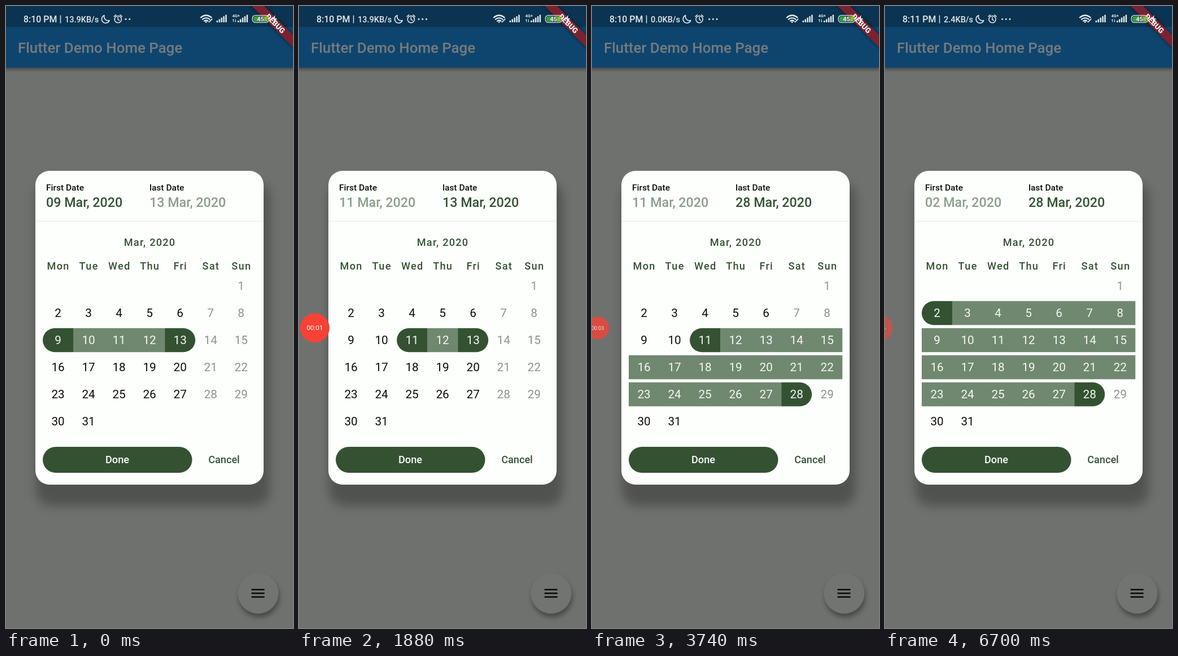
Write an HTML page that moves like this. It is 508x1102 px and loops after 7040 ms.

```html
<!DOCTYPE html>
<html lang="en">
<head>
<meta charset="utf-8">
<title>Date range picker</title>
<style>
html, body { margin: 0; width: 100%; height: 100%; overflow: hidden; background: #6f716f; }
svg { display: block; width: 100%; height: 100%; font-family: Roboto, sans-serif; }
.med { font-weight: 500; }
.mid { text-anchor: middle; }
.green { fill: #345232; }
.label { font-size: 15.5px; font-weight: 500; fill: #0b0d0b; }
.date { font-size: 23.28px; font-weight: 500; fill: #345232; }
.head { font-size: 18.1px; font-weight: 500; letter-spacing: 1.29px; fill: #345232; text-anchor: middle; }
.day { font-size: 20.7px; text-anchor: middle; }
.btn { font-size: 18.1px; font-weight: 500; text-anchor: middle; }
.line { fill: none; stroke: #e6eaec; stroke-width: 1.6; stroke-linecap: round; stroke-linejoin: round; }
</style>
</head>
<body>
<svg viewBox="0 0 508 1102" xmlns="http://www.w3.org/2000/svg">
  <defs>
    <filter id="blur9" x="-20%" y="-20%" width="140%" height="140%"><feGaussianBlur stdDeviation="9"/></filter>
    <filter id="blur4" x="-30%" y="-30%" width="160%" height="160%"><feGaussianBlur stdDeviation="4"/></filter>
    <filter id="blur3" x="-30%" y="-60%" width="160%" height="220%"><feGaussianBlur stdDeviation="3"/></filter>
  </defs>

  <rect width="508" height="1102" fill="#6f716f"/>
  <rect y="40" x="-10" width="528" height="72" fill="#000" opacity=".42" filter="url(#blur3)"/>
  <rect y="36" width="508" height="73" fill="#0e456f"/>
  <rect width="508" height="37" fill="#0a3451"/>
  <text class="med" x="21" y="83.3" font-size="25.87" fill="#777b7c">Flutter Demo Home Page</text>

  <circle cx="448" cy="1047" r="36" opacity=".36" filter="url(#blur4)"/>
  <circle cx="446.3" cy="1040.5" r="36" fill="#727472"/>
  <path d="M434.5 1034h23m-23 6.5h23m-23 6.5h23" stroke="#060706" stroke-width="2.6"/>

  <rect x="53" y="312" width="414" height="574" rx="28" opacity=".27" filter="url(#blur9)"/>
  <rect x="52" y="292" width="404" height="556" rx="25" fill="#fdfffd"/>
  <path d="M52 381.5h404" stroke="#eceeec" stroke-width="1.3"/>
  <text class="label" x="71" y="326.5">First Date</text>
  <text class="label" x="254" y="326.5">last Date</text>
  <text class="date" id="first" x="71" y="355.5"></text>
  <text class="date" id="last" x="254" y="355.5"></text>
  <text class="head" x="254.6" y="424.5">Mar, 2020</text>
  <path id="span" fill="#70886f"/>
  <path id="caps" class="green"/>
  <g id="grid"></g>
  <rect class="green" x="65" y="781" width="264.5" height="46" rx="23"/>
  <text class="btn" x="197" y="810.3" fill="#fbfdfb">Done</text>
  <text class="btn green" x="386" y="810.3">Cancel</text>

  <g transform="translate(508 0) rotate(45)">
    <rect x="-60" y="36.2" width="120" height="15.5" opacity=".5" filter="url(#blur3)"/>
    <rect x="-60" y="36.2" width="120" height="15.5" fill="#7a2230"/>
    <text class="mid" y="48.7" font-size="13.2" font-weight="900" fill="#f6f4f4">DEBUG</text>
  </g>

  <g fill="#e6eaec" class="med">
    <text id="clock" x="31" y="28.5" font-size="15.9"></text>
    <path d="M96.5 16.5v14" stroke="#e6eaec" stroke-width="1.4"/>
    <text id="speed" x="104" y="28.5" font-size="14.5"></text>
    <g id="tray">
      <path class="line" d="M174 16.6a7 7 0 1 0 9 9a7.2 7.2 0 0 1 -9 -9z"/>
      <circle class="line" cx="198.3" cy="23.6" r="6.1"/>
      <path class="line" d="M198.3 20v4l2.4 1.4M191.3 18.6l3.2-2.8M205.3 18.6l-3.2-2.8"/>
    </g>
    <g id="dots"></g>
    <g id="wifi" class="line" style="stroke-width:2.2">
      <path d="M344.8 20.3q9.4 -7.6 18.8 0M347.8 23.6q6.4 -5 12.8 0M351 26.7q3.2 -2.4 6.4 0"/>
      <path d="M359.4 28.4l5.4 -5.2" style="stroke-width:1.7"/>
    </g>
    <circle cx="354.2" cy="28.6" r="1.4"/>
    <g id="bars"></g>
    <text x="400.5" y="20" font-size="7.4" font-weight="700">4G+</text>
    <path class="line" style="stroke-width:1" d="M402.5 28v-4.5m-1.2 1.2l1.2-1.2M406 23.5v4.5m1.2-1.2l-1.2 1.2"/>
    <rect x="436.2" y="16.6" width="29" height="12.6" rx="5" fill="none" stroke="#e6eaec" stroke-width="1.3"/>
    <rect x="438" y="18.4" width="25.4" height="9" rx="3.4" fill="#46624e"/>
    <path d="M438 21.8a3.4 3.4 0 0 1 3.4-3.4h8v9h-8a3.4 3.4 0 0 1 -3.4-3.4z" fill="#35a03c"/>
    <path d="M457 18.4h3a3.4 3.4 0 0 1 3.4 3.4v2.2a3.4 3.4 0 0 1 -3.4 3.4h-3z" fill="#79c52c"/>
    <text class="mid" x="450.6" y="27" font-size="11.2" font-weight="700">45</text>
    <path d="M466.8 20.8q1.8 2 0 4.2z"/>
    <path d="M476.6 16l-6.2 7.6h4l-1 6.2l6.6-7.8h-4.2z"/>
  </g>

  <g id="rec">
    <circle r="26" fill="#f44336"/>
    <text id="timer" class="mid" y="4.1" font-size="11.6" fill="#fff"></text>
  </g>
</svg>
<script>
const LOOP = 7040, CELL = 54.03, LEFT = 65, HALF = 21.2;
const $ = id => document.getElementById(id);
const NS = 'http://www.w3.org/2000/svg';

function add(parent, tag, attrs, text) {
  const el = document.createElementNS(NS, tag);
  for (const k in attrs) el.setAttribute(k, attrs[k]);
  if (text !== undefined) el.textContent = text;
  return parent.appendChild(el);
}
const clamp = v => Math.max(0, Math.min(1, v));
const ramp = (t, a, b) => clamp((t - a) / (b - a));
const ease = v => v * v * (3 - 2 * v);
const pad = n => String(n).padStart(2, '0');
const col = d => (d + 5) % 7;
const row = d => Math.floor((d + 5) / 7);
const cellX = d => LEFT + CELL * col(d);
const cellY = d => 496 + 48 * row(d);

// value of a step list [[time, value], ...] at t
const step = (list, t) => list.reduce((v, [at, x]) => t >= at ? x : v, list[0][1]);

// linear blend between rows [time, ...values]
function track(rows, t) {
  let i = 0;
  while (i < rows.length - 2 && t >= rows[i + 1][0]) i++;
  const a = rows[i], b = rows[i + 1], k = ramp(t, a[0], b[0]);
  return a.slice(1).map((v, j) => v + (b[j + 1] - v) * k);
}

['Mon', 'Tue', 'Wed', 'Thu', 'Fri', 'Sat', 'Sun'].forEach((name, i) =>
  add($('grid'), 'text', { class: 'head', x: LEFT + CELL * (i + .5) + .6, y: 467.3 }, name));

const days = [];
for (let d = 1; d <= 31; d++)
  days[d] = add($('grid'), 'text', { class: 'day', x: cellX(d) + CELL / 2, y: cellY(d) + 7.4 }, d);

for (const x of [372.6, 410])
  for (let i = 0; i < 5; i++) {
    const h = 3.2 + i * 2.6;
    add($('bars'), 'rect', { x: x + i * 3.9, y: 29 - h, width: 2.5, height: h, rx: .8 });
  }

const dots = [0, 1, 2].map(i => add($('dots'), 'circle', { cx: 212 + i * 6.7, cy: 23.2, r: 1.5 }));

const startDay = [[0, 9], [780, 11], [4560, 2]];
const endDay = [[0, 13], [3140, 28]];
const speeds = [[0, '13.9'], [2000, '0.0'], [5020, '2.4']];
const recTrack = [ // time, x, scale, opacity
  [440, -28, 1, .6], [720, 28, 1, 1], [1880, 28, 1, 1], [2420, 16, .85, .88],
  [3740, 10, .78, .8], [4880, -13, 1, .6]
];

const cap = (d, left) => {
  const x = cellX(d), y = cellY(d) - HALF, r = HALF, w = CELL - r;
  return left
    ? `M${x + CELL} ${y}h${-w}a${r} ${r} 0 0 0 0 ${2 * r}h${w}z`
    : `M${x} ${y}h${w}a${r} ${r} 0 0 1 0 ${2 * r}h${-w}z`;
};

let shown = '';
function drawRange(a, b) {
  if (shown === a + '-' + b) return;
  shown = a + '-' + b;
  let span = '';
  for (let d = a + 1; d < b; d++)
    span += `M${cellX(d)} ${cellY(d) - HALF}h${CELL}v${2 * HALF}h${-CELL}z`;
  $('span').setAttribute('d', span);
  $('caps').setAttribute('d', cap(a, true) + cap(b, false));
  for (let d = 1; d <= 31; d++)
    days[d].setAttribute('fill', d >= a && d <= b ? '#f4f8f4' : col(d) > 4 ? '#8f918f' : '#0a0b0a');
  $('first').textContent = pad(a) + ' Mar, 2020';
  $('last').textContent = pad(b) + ' Mar, 2020';
}

function draw(t) {
  drawRange(step(startDay, t), step(endDay, t));

  const focus = 1 - ease(ramp(t, 1080, 1320)) + ease(ramp(t, 4040, 4240)) - ease(ramp(t, 6380, 6580));
  $('first').setAttribute('fill-opacity', .56 + .44 * focus);
  $('last').setAttribute('fill-opacity', 1 - .44 * focus);

  const speed = step(speeds, t);
  $('clock').textContent = t < 6170 ? '8:10 PM' : '8:11 PM';
  $('speed').textContent = speed + 'KB/s';
  const shift = speed.length < 4 ? -8.3 : 0;
  $('tray').setAttribute('transform', `translate(${shift} 0)`);
  $('dots').setAttribute('transform', `translate(${shift ? -4.4 : 0} 0)`);
  dots[2].setAttribute('visibility', t < 440 ? 'hidden' : 'visible');

  const [x, scale, alpha] = track(recTrack, t);
  $('rec').setAttribute('transform', `translate(${x} 570.3) scale(${scale})`);
  $('rec').setAttribute('opacity', alpha);
  $('rec').setAttribute('visibility', t < 440 ? 'hidden' : 'visible');
  $('timer').textContent = '00:' + pad(Math.max(0, Math.floor((t - 320) / 1000)));
}

let start;
function tick(now) {
  if (start === undefined) start = now;
  draw((now - start) % LOOP);
  requestAnimationFrame(tick);
}
draw(0);
requestAnimationFrame(tick);
</script>
</body>
</html>
```
